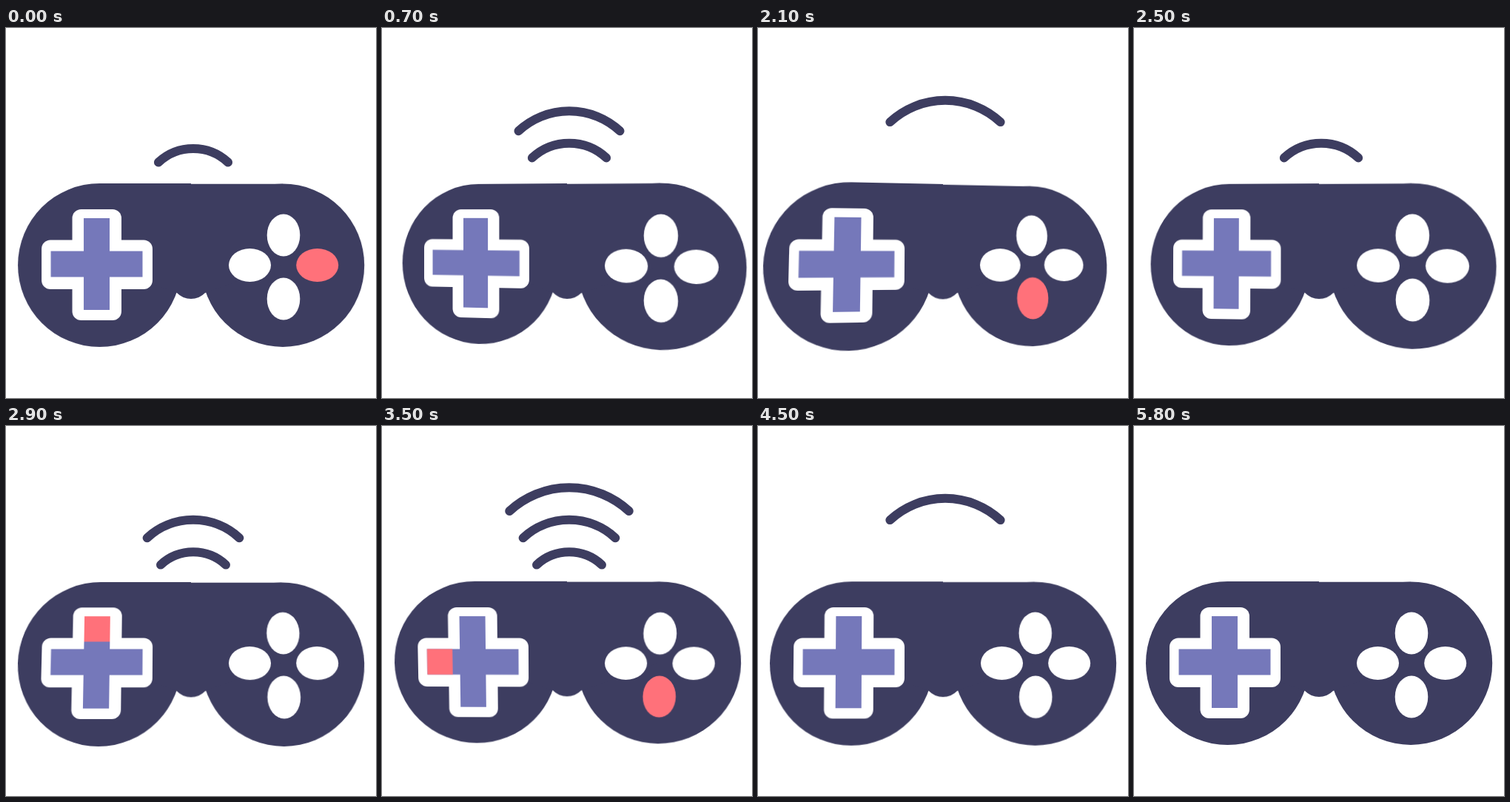
Write an HTML page that moves like this. It is 500 px wide and 500 px high and loops after 5.9 s.

```html
<!DOCTYPE html>
<html lang="en">
<head>
<meta charset="utf-8">
<title>Gamepad</title>
<style>
  html, body { margin: 0; width: 100%; height: 100%; overflow: hidden; background: #fff; }
  #stage { position: relative; width: 500px; height: 500px; overflow: hidden; perspective: 710px; }
  svg { position: absolute; left: 0; top: 0; width: 500px; height: 500px; overflow: visible; }
  #waves { fill: none; stroke: #3d3d60; stroke-width: 12; stroke-linecap: round; }
  #pad { transform-origin: 250px 320px; }
  .body { fill: #3d3d60; }
  .white { fill: #fff; }
  .cross { fill: #7578ba; }
  .key { fill: none; }
  .button { fill: #fff; }
  .pressed { fill: #ff717a; }
</style>
</head>
<body>
<div id="stage">
  <svg id="waves" viewBox="0 0 500 500"></svg>
  <svg id="pad" viewBox="0 0 500 500">
    <g class="body">
      <circle cx="126.5" cy="320.5" r="110.5"/>
      <circle cx="374" cy="320.7" r="110.2"/>
      <path d="M126 210H250V210.7H374V320L269 358A26.5 26.5 0 0 1 231 358L126 320Z"/>
    </g>
    <g class="white">
      <rect x="48" y="286.5" width="150" height="66.5" rx="12"/>
      <rect x="89.5" y="245" width="66.5" height="150" rx="12"/>
    </g>
    <path class="cross" d="M105 257H140V301.5H184.5V336.5H140V381H105V336.5H60.5V301.5H105Z"/>
    <rect id="up" class="key" x="105" y="257" width="35" height="34.5"/>
    <rect id="left" class="key" x="60.5" y="301.5" width="34.5" height="35"/>
    <ellipse class="button" cx="375" cy="280" rx="22.3" ry="28.5"/>
    <ellipse class="button" cx="329.5" cy="320.5" rx="28.5" ry="22.5"/>
    <ellipse id="east" class="button" cx="420.7" cy="320.5" rx="28.5" ry="22.5"/>
    <ellipse id="south" class="button" cx="375" cy="366" rx="22.3" ry="28.5"/>
  </svg>
</div>
<script>
  const LOOP = 5900, TICK = 100;
  const HOLD = 3;                            // ticks a control stays pressed
  const EASE = 2.7;                          // ticks a nudge takes to rise or fade
  const WAVE_GAP = 6, WAVE_LIFE = 13;
  const $ = id => document.getElementById(id);

  // Nudges of the pad: [tick of the peak, degrees]
  const yaw = [[6, -8.7], [13.7, 17.5], [20.7, 8.5], [26, -6], [30, 2], [35, -0.8]];
  const pitch = [[12, -2], [21, 5], [29.5, 5.2], [35, -4], [42.5, 4]];

  const presses = [['east', 0], ['south', 20], ['up', 28], ['south', 34], ['left', 34]];

  // Two bursts of three waves
  const waves = [-1, 23].flatMap(burst => [0, 1, 2].map(i => ({
    birth: burst + i * WAVE_GAP,
    path: $('waves').appendChild(document.createElementNS('http://www.w3.org/2000/svg', 'path'))
  })));

  const tilt = (nudges, t) =>
    nudges.reduce((sum, [peak, deg]) => sum + deg * Math.exp(-(((t - peak) / EASE) ** 2)), 0);

  function arc(age) {
    const size = 104 + 7.25 * age;
    const w = size * 0.423, r = size * 0.622, y = 274.3 - size * 0.834;
    return `M${253 - w} ${y}A${r} ${r} 0 0 1 ${253 + w} ${y}`;
  }

  function draw(t) {
    $('pad').style.transform = `rotateX(${tilt(pitch, t)}deg) rotateY(${tilt(yaw, t)}deg)`;
    for (const [id] of presses) {
      const held = presses.some(([key, from]) => key === id && t >= from && t < from + HOLD);
      $(id).classList.toggle('pressed', held);
    }
    for (const { birth, path } of waves) {
      const age = t - birth;
      path.setAttribute('d', age >= 0 && age <= WAVE_LIFE ? arc(age) : '');
    }
  }

  const start = performance.now();
  function frame() {
    draw(Math.floor((performance.now() - start) % LOOP / TICK));
    requestAnimationFrame(frame);
  }
  frame();
</script>
</body>
</html>
```
